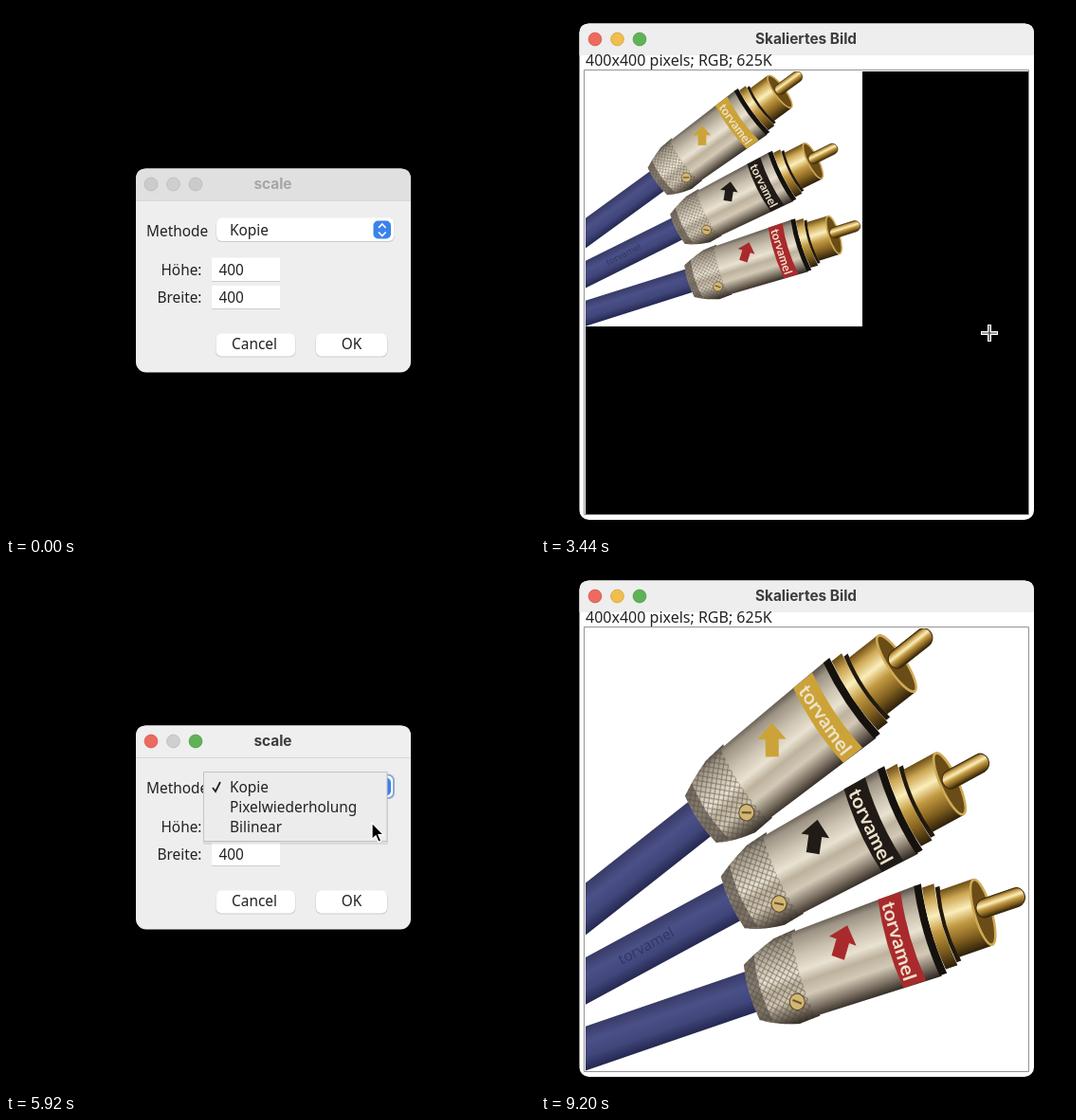
An HTML page that plays this animation: 558 px wide and 558 px high, repeating every 9280 ms.

```html
<!DOCTYPE html>
<html lang="de">
<head>
<meta charset="utf-8">
<style>
html, body { margin: 0; width: 100%; height: 100%; overflow: hidden; background: #000; }
svg { display: block; width: 100vw; height: 100vh; }
text { font: 15.4px "Noto Sans", "Open Sans", sans-serif; fill: #222; }
.title { font: 700 15.4px Inter, "Liberation Sans", sans-serif; text-anchor: middle; fill: #3c3c3c; }
.mid { text-anchor: middle; }
.end { text-anchor: end; }
.print { font: 700 20px Lato, sans-serif; text-anchor: middle; fill: #eee2cc; }
.tint { fill: var(--tint); }
.inactive .bar { fill: #e0e0e0; }
.inactive .title { fill: #a6a6a6; }
.inactive .light { fill: #cbcbcb; stroke: #b8b8b8; }
</style>
</head>
<body>
<svg viewBox="0 0 558 558">
<defs>
  <linearGradient id="silver" x2="0" y2="1">
    <stop stop-color="#575046"/><stop offset=".1" stop-color="#9c9384"/>
    <stop offset=".3" stop-color="#cdc4b2"/><stop offset=".46" stop-color="#e9e2d2"/>
    <stop offset=".58" stop-color="#bdb29d"/><stop offset=".72" stop-color="#d3c9b6"/>
    <stop offset=".88" stop-color="#776c5e"/><stop offset="1" stop-color="#2b2520"/>
  </linearGradient>
  <linearGradient id="gold" x2="0" y2="1">
    <stop stop-color="#6b4d14"/><stop offset=".16" stop-color="#cda754"/>
    <stop offset=".36" stop-color="#fbeebb"/><stop offset=".55" stop-color="#c39a42"/>
    <stop offset=".78" stop-color="#82601f"/><stop offset="1" stop-color="#2c1f0a"/>
  </linearGradient>
  <linearGradient id="blue" x2="0" y2="1">
    <stop stop-color="#383b66"/><stop offset=".35" stop-color="#4b5088"/>
    <stop offset=".7" stop-color="#40457a"/><stop offset="1" stop-color="#242850"/>
  </linearGradient>
  <pattern id="knurl" width="7" height="7" patternUnits="userSpaceOnUse">
    <path d="M0 0L7 7M7 0L0 7" stroke="#4d453b" stroke-opacity=".6"/>
  </pattern>
  <clipPath id="frame"><path d="M47 69H514V536H47Z"/></clipPath>
  <path id="boot" d="M-303 -27Q-288 -35 -265 -42L-241 -44Q-249 0 -241 44L-264 45Q-288 39 -303 29Q-308 0 -303 -27Z"/>

  <!-- Plug along the x axis, front end at the origin -->
  <g id="plug">
    <path d="M-600 -20.500H-295V20.500H-600Z" fill="url(#blue)"/>
    <use href="#boot" fill="url(#silver)"/>
    <use href="#boot" fill="url(#knurl)"/>
    <path d="M-303 -27Q-308 0 -303 29L-290 34Q-297 0 -290 -33Z" fill="#544b41" opacity=".65"/>
    <path d="M-246 -42L-107 -46Q-114 0 -107 46L-246 43Q-253 0 -246 -42Z" fill="url(#silver)"/>
    <path d="M-149 -45H-124Q-131 0 -124 45H-149Q-156 0 -149 -45Z" class="tint"/>
    <text class="print" transform="translate(-147 0) rotate(90)">torvamel</text>
    <path d="M0 -17L15 -1H7V16H-7V-1H-15Z" class="tint" transform="translate(-197 -17) rotate(35)"/>
    <path d="M-109 -46H-101Q-108 0 -101 45H-109Q-116 0 -109 -46Z" fill="#15110d"/>
    <path d="M-101 -42H-88Q-95 0 -88 41H-101Q-108 0 -101 -42Z" fill="url(#gold)"/>
    <path d="M-88 -38H-83Q-90 0 -83 38H-88Q-95 0 -88 -38Z" fill="#231a0c"/>
    <path d="M-84 -34H-47V34H-84Q-91 0 -84 -34Z" fill="url(#gold)"/>
    <ellipse cx="-47" rx="9" ry="33" fill="#6a4c16" stroke="#cfab58" stroke-width="2.5"/>
    <rect x="-53" y="-12.500" width="53" height="18.500" rx="9" fill="url(#gold)" stroke="#3c2a0c"/>
    <circle cx="-260" cy="24" r="8" fill="#d2b673" stroke="#5a4a2c"/>
    <path d="M-264 21L-256 27" stroke="#6b572e" stroke-width="2"/>
  </g>
</defs>

<g id="result">
  <rect x="40.500" y="18.500" width="479.500" height="523.500" rx="10" fill="#fff"/>
  <path d="M40.500 52V28.500Q40.500 18.500 50.500 18.500H510Q520 18.500 520 28.500V52Z" fill="#eee"/>
  <g stroke-width=".8">
    <circle cx="57" cy="35" r="6.9" fill="#ec6a5e" stroke="#d5584c"/>
    <circle cx="80.500" cy="35" r="6.9" fill="#f0bd4f" stroke="#d8a53d"/>
    <circle cx="104" cy="35" r="6.9" fill="#60b256" stroke="#4f9c47"/>
  </g>
  <text class="title" x="279.500" y="39.500">Skaliertes Bild</text>
  <text x="47" y="63" style="font-size:16px">400x400 pixels; RGB; 625K</text>
  <path d="M45.500 67.500H514.500V536.500H45.500Z" stroke="#949494" fill="#fff"/>
  <path d="M47 69H514V536H47Z"/>
  <g id="photo">
    <g clip-path="url(#frame)">
      <path d="M46 68H515V537H46Z" fill="#fff"/>
      <use href="#plug" transform="translate(413 76) scale(1 1.087) rotate(-36)" style="--tint:#cba338"/>
      <use href="#plug" transform="translate(473 210) scale(1 1.087) rotate(-26.500)" style="--tint:#211b17"/>
      <use href="#plug" transform="translate(511 353) scale(1 1.087) rotate(-17.500)" style="--tint:#a92a2c"/>
      <text transform="translate(85 424) rotate(-28.600)" style="fill:#242a4c" opacity=".6">torvamel</text>
    </g>
  </g>
</g>

<g id="dialog">
  <rect x="137" y="171.500" width="290" height="215" rx="11" fill="#eee"/>
  <path class="bar" d="M137 205V182.500Q137 171.500 148 171.500H416Q427 171.500 427 182.500V205Z" fill="#efefef"/>
  <path d="M137 205.500H427" stroke="#d6d6d6"/>
  <g stroke-width=".8">
    <circle class="light" cx="153" cy="188" r="6.9" fill="#ec6a5e" stroke="#d5584c"/>
    <circle cx="176.500" cy="188" r="6.9" fill="#cfcfcf" stroke="#bcbcbc"/>
    <circle class="light" cx="200" cy="188" r="6.9" fill="#60b256" stroke="#4f9c47"/>
  </g>
  <text class="title" x="281.500" y="192.500">scale</text>
  <g fill="#cdcdcd">
    <rect x="221.500" y="224" width="188.500" height="25" rx="6"/>
    <path d="M217 266H289V291H217ZM217 296H289V320H217Z"/>
    <rect x="221" y="346" width="84.500" height="24.500" rx="6"/>
    <rect x="326.500" y="346" width="76" height="24.500" rx="6"/>
  </g>
  <g fill="#fff">
    <rect x="222" y="223.500" width="187.500" height="24.500" rx="6"/>
    <path d="M217 265.500H289V290H217ZM217 295H289V319H217Z"/>
    <rect x="221.500" y="345.500" width="83.500" height="24" rx="6"/>
    <rect x="327" y="345.500" width="75" height="24" rx="6"/>
  </g>
  <rect x="387.500" y="226.500" width="18.500" height="19" rx="5" fill="#3b82ea"/>
  <path d="M393 234L396.800 230L400.600 234M393 238.500L396.800 242.500L400.600 238.500" fill="none" stroke="#fff" stroke-width="1.700"/>
  <text x="148" y="242.500">Methode</text>
  <text x="236" y="241.500" id="choice">Kopie</text>
  <text class="end" x="206.500" y="283.500">Höhe:</text>
  <text class="end" x="206.500" y="312.500">Breite:</text>
  <text x="224.500" y="283.500">400</text>
  <text x="224.500" y="312.500">400</text>
  <text class="mid" x="262" y="362">Cancel</text>
  <text class="mid" x="364.500" y="362">OK</text>
  <g id="popup">
    <rect x="222" y="223.500" width="187" height="24.500" rx="6" fill="none" stroke="#8fa9d2" stroke-width="2"/>
    <rect x="208" y="222" width="195" height="75" fill="#000" opacity=".08"/>
    <rect x="208.500" y="220.500" width="193.500" height="73" fill="#ececec" stroke="#c3c3c3"/>
    <path d="M218 237L221 241L226 231" fill="none" stroke="#222" stroke-width="1.800"/>
    <text x="236" y="241.500">Kopie</text>
    <text x="236" y="262.500">Pixelwiederholung</text>
    <text x="236" y="283.500">Bilinear</text>
  </g>
</g>

<g id="pointer">
  <path id="arrow" d="M0 0V17.500L4 13.800L6.800 20.300L9.800 19L7 12.600H12.300Z" stroke="#fff" stroke-width="1.300"/>
  <g id="cross">
    <path d="M-6 4H12M3 -5V13" stroke="#fff" stroke-width="4"/>
    <path d="M-5 4H11M3 -4V12" stroke="#333" stroke-width="1.200"/>
  </g>
</g>
</svg>
<script>
const LOOP = 9280, STEP = 80;
const $ = id => document.getElementById(id);
const show = (id, on) => $(id).setAttribute('display', on ? 'inline' : 'none');
const within = (t, from, to) => t >= from && t < to;

// Pointer stops: time, x, y
const path = [
  [0, 566, 290], [240, 566, 290], [960, 374, 352], [3280, 374, 352], [3600, 566, 330],
  [3680, 566, 218], [4000, 429, 237], [4400, 398, 232], [4960, 398, 232], [5440, 386, 274],
  [6080, 386, 274], [6800, 381, 353], [8640, 381, 353], [9120, 566, 335], [LOOP, 566, 335]
];

function pointerAt(t) {
  const i = path.findIndex(p => p[0] > t);
  const [t0, x0, y0] = path[i - 1], [t1, x1, y1] = path[i];
  const k = (t - t0) / (t1 - t0), e = k * k * (3 - 2 * k);
  return [x0 + (x1 - x0) * e, y0 + (y1 - y0) * e];
}

function draw(now) {
  const t = Math.floor(now % LOOP / STEP) * STEP;
  const result = within(t, 1440, 3600) || t >= 7280;
  const [x, y] = pointerAt(t);
  const cross = (within(t, 1760, 3600) || t >= 7600) && x < 512;

  show('result', result);
  show('dialog', !result);
  show('popup', within(t, 4960, 6160));
  show('arrow', !cross);
  show('cross', cross);
  $('dialog').setAttribute('class', within(t, 1040, 1440) || within(t, 4480, 7280) ? '' : 'inactive');
  $('choice').textContent = within(t, 6160, 7280) ? 'Bilinear' : 'Kopie';
  $('photo').setAttribute('transform',
    t < 7280 ? 'translate(47 69) scale(.625 .576) translate(-47 -69)' : '');
  $('pointer').setAttribute('transform', `translate(${x} ${y})`);
  requestAnimationFrame(() => draw(performance.now() - start));
}
const start = performance.now();
draw(0);
</script>
</body>
</html>
```
